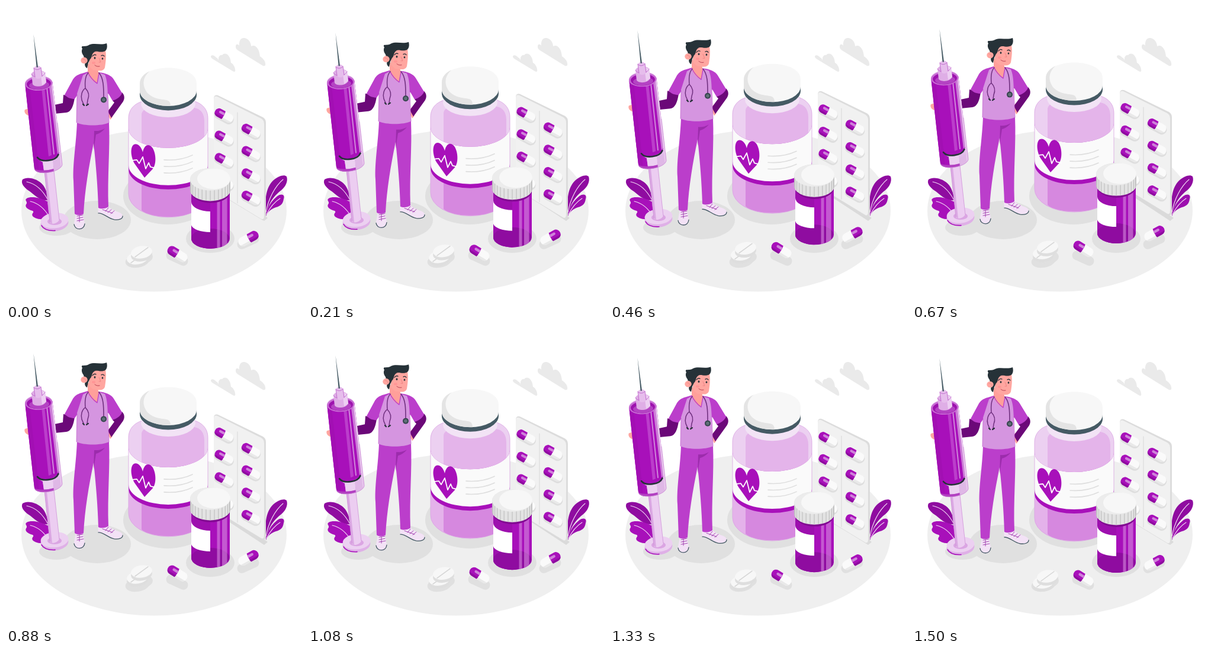
An HTML page with a canvas for the animation above (1.54 s loop, 500 px wide and 500 px high).

```html
<!DOCTYPE html>
<html lang="en">
<head>
<meta charset="utf-8">
<title>Pharmacy</title>
<style>
html, body { margin: 0; width: 100%; height: 100%; overflow: hidden; background: #fff; }
canvas { display: block; width: 100vw; height: 100vh; }
</style>
</head>
<body>
<canvas id="stage" width="500" height="500"></canvas>
<script>
const ctx = document.getElementById('stage').getContext('2d');
const LOOP = 1540, STEPS = 37, RISE = 9;
const PURPLE = '#a810ba', DEEP = '#8f0ca0', SCRUBS = '#bb3ecb', LILAC = '#ecd0f1',
  INK = '#263238', SLATE = '#455a64', SKIN = '#ffa6a0', SHADOW = '#e0e0e0';

function fill(d, color) {
  ctx.fillStyle = color;
  ctx.fill(new Path2D(d));
}

function line(d, color, width = 1) {
  ctx.strokeStyle = color;
  ctx.lineWidth = width;
  ctx.stroke(new Path2D(d));
}

function oval(x, y, rx, ry, color, angle = 0) {
  ctx.fillStyle = color;
  ctx.beginPath();
  ctx.ellipse(x, y, rx, ry, angle, 0, 7);
  ctx.fill();
}

function clipped(d, draw) {
  ctx.save();
  ctx.clip(new Path2D(d));
  draw();
  ctx.restore();
}

function capsule(x, y, angle, length, width, color) {
  const dx = Math.cos(angle) * (length - width) / 2, dy = Math.sin(angle) * (length - width) / 2;
  line(`M${x - dx} ${y - dy}L${x + dx} ${y + dy}`, color, width);
}

function pill(x, y, angle, length = 34, width = 15, flip = 1) {
  const half = length / 2, r = width / 2;
  ctx.save();
  ctx.translate(x, y);
  ctx.rotate(angle);
  ctx.beginPath();
  ctx.roundRect(-half, -r, length, width, r);
  ctx.clip();
  ctx.fillStyle = '#fafafa';
  ctx.fillRect(-half, -r, length, width);
  ctx.fillStyle = '#e9e9e9';
  ctx.fillRect(-half, r * 0.55, length, r);
  ctx.scale(flip, 1);
  fill(`M${-half} ${-r}H-1Q1 0 -1 ${r}H${-half}Z`, PURPLE);
  fill(`M${-half} ${r * 0.5}H0L-1 ${r}H${-half}Z`, DEEP);
  fill(`M-9 ${-r * 0.55}H-0.5L0 0H-9Q-12 ${-r * 0.3} -9 ${-r * 0.55}Z`, '#cf83da');
  ctx.restore();
}

function drawClouds() {
  fill('M388 68C388 64 392 64 394 67C393 55 400 52 406 55C411 57 414 63 414 68C421 64 428 72 429 85C432 87 438 92 438 97C439 101 437 102 434 101L392 75C388 72 388 70 388 68Z', '#eaeaea');
  fill('M346 85C347 82 352 83 355 87C357 88 358 89 359 92C358 84 363 82 365 83C370 77 379 82 380 96C383 97 387 103 387 107C388 111 386 112 383 110L350 90C347 88 346 87 346 85Z', '#eaeaea');
}

function drawLeaves() {
  fill('M71 328C58 330 48 319 40 313C32 308 24 300 28 293C36 287 55 292 63 303C68 310 71 320 71 328Z', DEEP);
  fill('M35 325C42 321 56 324 63 327L72 331L76 358C67 362 50 361 45 355C42 350 49 349 45 346C38 344 31 340 34 335C38 331 30 328 35 325Z', PURPLE);
  line('M35 297C50 300 62 311 71 328', '#f2d9f5', 1.1);
  line('M41 330C55 333 66 344 73 356', '#f2d9f5', 1.1);
  fill('M439 353C437 330 438 308 451 295C460 287 470 284 474 288C477 296 472 306 464 312C455 319 444 330 439 353Z', DEEP);
  fill('M439 355C440 340 452 324 462 319C468 317 471 320 469 326C468 334 464 338 456 340C447 343 442 348 439 355Z', '#9c0eae');
  line('M468 293C455 304 443 325 439 349', '#f2d9f5', 1.1);
  line('M463 325C455 330 446 340 440 352', '#f2d9f5', 1.1);
}

function drawGround() {
  oval(250, 346, 224, 136.5, '#efefef');
  oval(85, 374, 29, 14, SHADOW);
  oval(154, 361.5, 57, 32.5, SHADOW);
  oval(273, 321, 75, 48, SHADOW);
  oval(345, 393, 41, 24, SHADOW);
  fill('M366 317L436 363L442 358L376 312Z', '#dadada');
  oval(222, 430.5, 20.5, 11.5, SHADOW, -0.15);
  oval(230, 425, 18, 11, SHADOW, -0.15);
  capsule(289, 426, 0.42, 39, 16, SHADOW);
  capsule(409, 398, -0.42, 39, 16, SHADOW);
}

function drawSyringe() {
  // piston base and rod
  oval(82, 367, 23.5, 13.5, '#dfb0e7', -0.1);
  oval(82, 362.5, 23.5, 13, LILAC, -0.1);
  line('M60 371C64 378 72 380 83 379.5', PURPLE, 1.6);
  oval(82, 364, 12, 6, '#dba5e3');
  fill('M63 262L79 260L90 361C87 368 76 370 74 365Z', '#eccdf1');
  fill('M63 262L67 262L78 368L74 365Z', '#dba8e3');
  line('M64 270L74 365M80 270L90 361', '#cb8ad5', 0.7);

  // glass barrel
  const barrel = 'M32 131C33 115 76 113 78.500 129L95 268C93 281 51 288 48 275Z';
  fill(barrel, 'rgba(218,166,227,.75)');
  clipped(barrel, () => {
    fill('M32 131L79 128L86 196L90 248C85 261 57 265 52 258L62 264L65 286L47 278Z', PURPLE);
    fill('M32 131L40 138L54 258L56 285L46 280Z', '#a20fb3');
    fill('M72 128L83 128L92 245L87 250Z', '#cc7ed7');
    fill('M60 138L65 138L77 252L72 254Z', '#bb3ecb');
    line('M69 137L81 250', '#cf88da', 2);
    line('M78 130L94 270', '#e9c9ee', 3);
    fill('M62 263L79 261L80.500 275Q72 278 64 277Z', LILAC);
    fill('M48 276Q64 280 80.500 275L81 284H48Z', '#b23fc1');
    line('M53 256C60 265 84 262 88.500 251', INK, 2.6);
  });
  line('M48 275C51 288 93 281 95 268L87 198', '#ca86d4', 0.8);
  oval(55.3, 131, 23.3, 12, '#c86cd4', -0.05);
  oval(55.5, 131.5, 20.5, 9.8, '#9d12ae', -0.05);
  oval(56, 134, 17, 7, '#b443c3', -0.05);

  // hub and needle
  fill('M43 115C45 108 63 107 66 113L68 129C64 137 48 138 45 132Z', '#dfaee6');
  fill('M58 109L66 113L68 129L61 134Z', '#edcff2');
  line('M43 115C46 123 64 121 66 113', '#bd65ca', 0.9);
  fill('M47 105C49 100 57 100 59 104L61 119C58 124 51 124 49 120Z', '#e6bdec');
  line('M47 105C50 109 57 108 59 104L61 119M47 105L49 120', '#b95ac6', 0.8);
  fill('M46.500 48L54 103Q52.500 104.500 51.500 103Z', SLATE);
}

function drawTrousersAndShoes() {
  fill('M118 351L130 351L133 367C134 379 121 380 116 374L115 367Z', '#f3e2f6');
  line('M115 369C116 379 132 380 133 368', SLATE, 1.3);
  line('M120 355L130 353M120 359L130 357M120 363L131 361M124 354L124 365', '#9b35aa', 0.9);
  fill('M155 341L172 337C176 343 184 346 192 349C199 352 198 358 192 360C182 362 175 358 167 353L156 350Z', '#f3e2f6');
  line('M156 350C166 350 172 359 183 361C190 362 197 360 197 355', SLATE, 1.3);
  line('M163 344L180 350M168 347L173 341M172 349L178 344M177 351L183 346', '#9b35aa', 0.9);
  fill('M120 195L174 197C176 240 171 290 173 339C168 343 160 343 156 341C155 305 152 270 148 232C140 270 133 312 131 351C126 354 120 354 116 351L114 295C112 270 119 230 120 195Z', SCRUBS);
  fill('M149 211Q158 212 167 207Q160 215 152 217L148 243Z', '#9c2cac');
}

function drawHead() {
  fill('M138 98L154 102L157 115L154 131C147 128 141 121 138 113Z', '#ff9f9a');
  fill('M143 76L168 75C170 85 168 98 167 104C164 112 155 109 147 108L139 101Z', SKIN);
  fill('M129 72C125 66 133 69 138 67C147 61 160 67 170 63C172 70 170 76 165 77C158 79 153 75 149 78C144 81 146 87 142 90L139 96L137 105C134 104 132 99 134 96L131 84C128 80 127 76 129 72Z', INK);
  oval(132, 92, 5.7, 5.3, SKIN);
  line('M130 90Q134 90 135 94', '#ed8583', 0.8);
  oval(150, 88, 1.4, 1.8, INK);
  oval(163, 89, 1.3, 1.7, INK);
  line('M146 85Q149 81 152 83M161 84Q164 82 166 85', INK, 1.3);
  line('M157 88L160 95L157 95', '#ec7f80', 0.9);
  line('M150 100Q153 103 158 102', '#b94052', 1);
  oval(148, 96, 3, 2, '#ff9696');
}

function drawMan() {
  drawTrousersAndShoes();
  fill('M97 150L116 155C114 169 110 179 102 180L82 182L82 167L96 164Z', '#6b0878');
  fill('M174 174C179 175 184 186 176 192L173 186Z', SKIN);
  fill('M180 160L196 146C201 151 201 158 196 164L178 189L172 178L183 163Z', '#6b0878');
  fill('M138 111L128 114C120 116 115 120 112 126L99 150C104 155 109 157 116 157L122 148L173 148L180 160C187 158 194 153 196 147L182 124C178 117 168 113 156 112Z', SCRUBS);
  fill('M120 148L130 117L139 112L154 131L157 113L167 116C173 130 171 146 174 197C161 203 132 203 119 197Z', '#d595e0');
  line('M120 150L119 197M172 148L174 197', '#bd57ca', 0.7);
  drawHead();
  line('M138 112Q144 124 154 131L157 114', SCRUBS, 1.3);
  line('M139 113C134 118 133 128 134 139C128 143 126 152 128 159L131 166M134 139C140 145 141 152 138 159L137 166', '#70307f', 1.5);
  line('M130 166L132 168M136 168L139 166', INK, 2.2);
  line('M157 113C165 122 165 138 165 154', '#70307f', 1.6);
  oval(165, 158.500, 5, 5, '#37474f');
  oval(165, 158.500, 2.8, 2.8, '#607078');
}

function drawBottle() {
  const glass = 'M207 190C207 172 220 163 235 160L315 160C331 164 341 174 341 190V318A67 39 0 0 1 207 318Z';
  fill(glass, LILAC);
  clipped(glass, () => {
    fill('M229 184Q229 174 242 174L310 172C327 170 335 180 335 194L335 250H229Z', '#e4b4ea');
    fill('M207 270H341V360H207Z', '#e4b2ea');
    fill('M229 280H335V338C325 350 303 356 274 356C250 356 235 351 229 345Z', '#d688df');
    fill('M207 207A67 33 0 0 0 341 207V276A67 34 0 0 1 207 276Z', PURPLE);
    fill('M207 207A67 33 0 0 0 341 207V269A67 34 0 0 1 207 269Z', '#fafafa');
  });
  line(glass, '#d9a2e1', 0.8);

  fill('M231 247C229 238 222 231 216 234C209 239 211 255 217 266L234 290L248 275C255 266 253 247 247 239C240 231 233 236 231 247Z', PURPLE);
  line('M213 261L221 260L225 266L231 255L236 275L241 265L244 272L252 274', '#fff', 1.8);
  for (const y of [260, 271, 282]) line(`M267 ${y}Q294 ${y + 2} 315 ${y - 8}`, '#dedede', 1.6);

  // neck and cap
  oval(274, 165, 46, 23, '#f2e3f5');
  fill('M226 142H322V150A48 26.500 0 0 1 226 150Z', SLATE);
  fill('M226 131C226 115 247 104.500 274 104.500C301 104.500 322 115 322 131V143A48 26 0 0 1 226 143Z', '#f7f7f7');
  fill('M226 131C226 122 233 114 243 110C229 121 230 137 240 148C250 157 260 157 271 159Q278 160 278 169C247 169 226 158 226 143Z', '#e4e4e4');
}

function drawBlister() {
  fill('M351 157Q351 149 358 151L434 188Q439 191 439 197V356Q439 365 432 361L356 315Q351 312 351 306Z', '#dcdcdc');
  fill('M351 158Q351 151 357 153L431 190Q436 193 436 199V354Q436 363 430 359L356 314Q351 311 351 306Z', '#f1f1f1');
  line('M391 180V333', '#dedede', 1.3);
  for (let row = 0; row < 4; row++) {
    for (const [x, top] of [[368, 185], [413.5, 211]]) {
      const y = top + row * 37.7;
      capsule(x, y + 2, 0.5, 36, 17, '#dedede');
      pill(x + 0.3, y, 0.5);
    }
  }
}

function drawJar() {
  const body = 'M313 305H378V393A32.500 17 0 0 1 313 393Z';
  fill(body, PURPLE);
  clipped(body, () => {
    fill('M313 305H345V415H313Z', '#9d0fae');
    oval(345, 393, 32.5, 17, DEEP);
    ctx.fillStyle = 'rgba(220,150,228,.55)';
    ctx.fillRect(356.5, 305, 5, 110);
    ctx.fillRect(365, 305, 8.5, 110);
    fill('M313 312A33 19 0 0 0 378 312V317A33 19 0 0 1 313 317Z', '#820a92');
    fill('M313 331A32 16 0 0 0 345 347V382A32 13 0 0 1 313 370Z', '#fff');
  });
  const cap = 'M311 293A34 19 0 0 1 379 293V311A34 18.500 0 0 1 311 311Z';
  fill(cap, '#e3e3e3');
  clipped(cap, () => {
    for (let i = 0; i < 15; i++) {
      const x = 345 - 34 * Math.cos(Math.PI * (i + 0.5) / 15);
      line(`M${x} 296V335`, '#bdbdbd', 1.1);
    }
  });
  oval(345, 293, 34, 18.8, '#ececec');
  oval(351, 292, 28, 17.5, '#f7f7f7');
}

function tablet(x, y) {
  oval(x, y + 5, 18, 10.5, '#dedede', -0.15);
  oval(x, y, 18, 10.5, '#f7f7f7', -0.15);
  line(`M${x - 11} ${y + 8}L${x + 11} ${y - 8}`, '#d5d5d5', 1.5);
}

function drawScene(lift) {
  ctx.fillStyle = '#fff';
  ctx.fillRect(0, 0, 500, 500);
  ctx.lineCap = ctx.lineJoin = 'round';
  drawGround();
  drawClouds();
  drawLeaves();
  ctx.save();
  ctx.translate(0, -lift);
  fill('M39 173L32 175C30 178 32 184 40 186Z', SKIN);
  drawMan();
  drawSyringe();
  drawBottle();
  drawBlister();
  drawJar();
  tablet(222, 426);
  tablet(229, 416);
  pill(289.500, 419, 0.55, 37, 16);
  pill(409.500, 393, -0.5, 37, 16, -1);
  ctx.restore();
}

function frame(now) {
  const step = Math.floor((now % LOOP) / LOOP * STEPS + 0.1);
  const phase = (step + 1.3) / STEPS * 2 * Math.PI;
  drawScene(RISE * (1 - Math.cos(phase)) / 2);
  requestAnimationFrame(frame);
}
requestAnimationFrame(frame);
</script>
</body>
</html>
```
